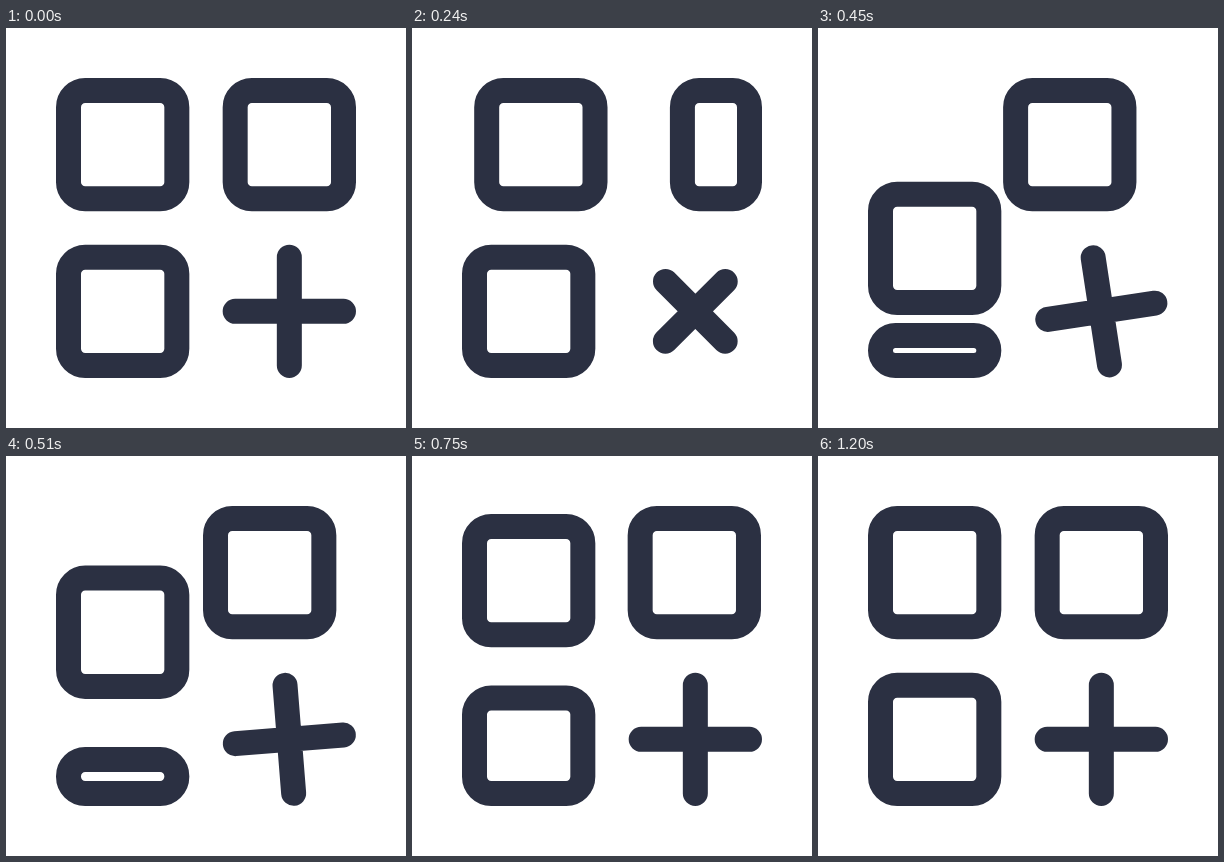
Animation, 400 px wide and 400 px high, one loop 3.23 s. Source, as an HTML page:

```html
<!DOCTYPE html>
<html lang="en">
<head>
<meta charset="utf-8">
<title>Add tile</title>
<style>
  html, body { margin: 0; width: 100%; height: 100%; overflow: hidden; background: #fff; }
  svg { display: block; width: 100%; height: 100%; }
  rect, path { fill: none; stroke: #2b3042; stroke-width: 25; stroke-linecap: round; }
</style>
</head>
<body>
<svg viewBox="0 0 400 400">
  <rect id="slider"/>
  <rect id="riser"/>
  <rect id="leaver"/>
  <rect id="comer"/>
  <path id="plus"/>
</svg>
<script>
const LOOP = 3230, STEP = 30, MOVE = 700, STAGGER = 140;
const NEAR = 62.5, FAR = 229.17, SIZE = 108.33, GAP = FAR - NEAR;
const [slider, riser, leaver, comer, plus] =
  ['slider', 'riser', 'leaver', 'comer', 'plus'].map(id => document.getElementById(id));

// Progress along cubic-bezier(x1, 0, x2, 1), solved by bisection
function ease(t, start, x1 = 0.4, x2 = 0) {
  const x = Math.min(1, Math.max(0, (t - start) / MOVE));
  if (x === 0 || x === 1) return x;
  let lo = 0, hi = 1, u;
  for (let i = 0; i < 24; i++) {
    u = (lo + hi) / 2;
    const v = 1 - u;
    if (3 * v * v * u * x1 + 3 * v * u * u * x2 + u ** 3 < x) lo = u; else hi = u;
  }
  return u * u * (3 - 2 * u);
}

function set(el, attrs) {
  for (const name in attrs) el.setAttribute(name, attrs[name]);
}

function tile(el, x, y, width = SIZE, height = SIZE, shown = true) {
  const r = Math.min(16.67, width / 2, height / 2);
  set(el, { x, y, width, height, rx: r, ry: r, visibility: shown ? 'visible' : 'hidden' });
}

function draw(t) {
  tile(slider, NEAR + GAP * ease(t, STAGGER), NEAR);
  tile(riser, NEAR, FAR - GAP * ease(t, 2 * STAGGER));

  const turn = ease(t, 0, 0.36, 0.22);
  const w = SIZE * (1 - 0.76 * turn);
  tile(leaver, FAR + SIZE - w, NEAR, w, SIZE, t < 350);

  const h = SIZE * (0.274 + 0.726 * ease(t, 3 * STAGGER));
  tile(comer, NEAR, FAR + SIZE - h, SIZE, h, t >= 450);

  const dip = t < 350 ? Math.sin(Math.PI * t / 350) ** 2 : 0;
  const arm = SIZE / 2 * (1 - 0.316 * dip);
  set(plus, {
    d: `M${-arm} 0H${arm}M0 ${-arm}V${arm}`,
    transform: `translate(283.33 283.33) rotate(${90 * turn})`
  });

  // Before the first step the tiles rest in their starting cells
  if (t === 0) tile(comer, NEAR, FAR, SIZE, SIZE, false);
}

const begin = performance.now();
function tick() {
  const t = (performance.now() - begin) % LOOP;
  draw(Math.floor(t / STEP) * STEP);
  requestAnimationFrame(tick);
}
tick();
</script>
</body>
</html>
```
